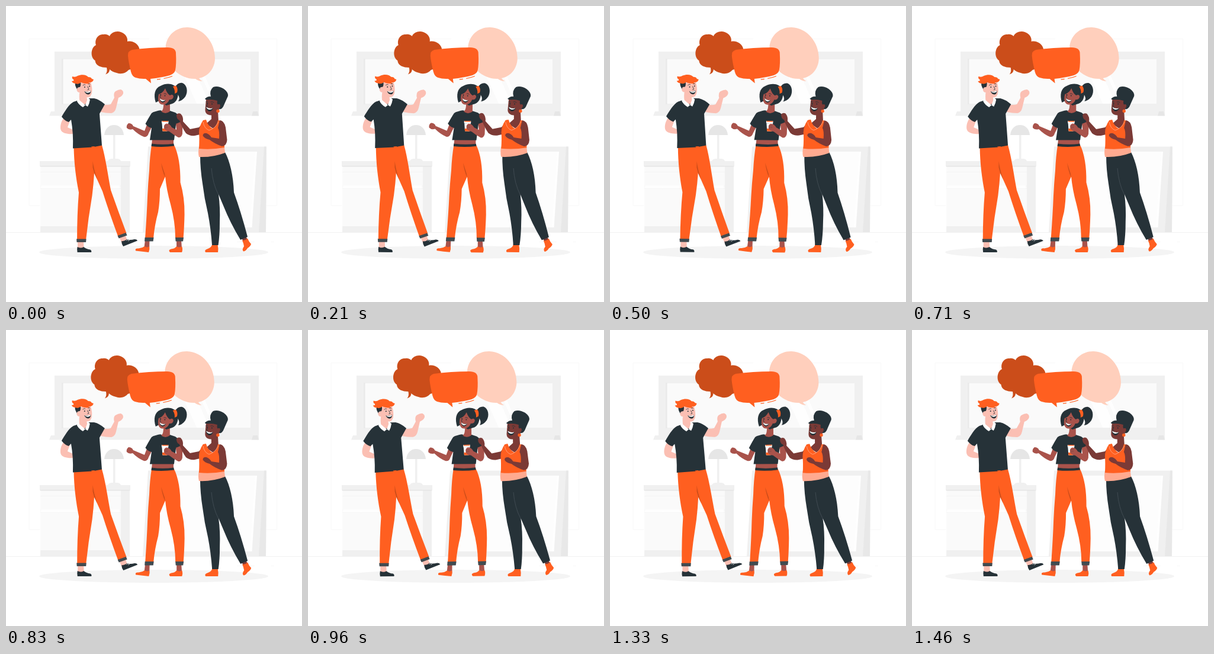
An HTML page that plays this animation: 500 px wide and 500 px high, repeating every 1500 ms.

```html
<!DOCTYPE html>
<html lang="en">
<head>
<meta charset="utf-8">
<title>Friends talking</title>
<style>
html, body { margin: 0; width: 100%; height: 100%; overflow: hidden; background: #fff; }
svg { display: block; width: 100%; height: 100%; }
.o { fill: #ff5f20; }
.r { fill: #cb4d1a; }
.d { fill: #263238; }
.c { fill: #414b50; }
.w { fill: #fff; }
.s1 { fill: #fbbfb3; }
.s2 { fill: #a9534b; }
.s3 { fill: #7b3a36; }
.g1 { fill: #fafafa; }
.g2 { fill: #f0f0f0; }
.g3 { fill: #e6e6e6; }
.l { fill: none; stroke: #263238; stroke-width: .8; stroke-linecap: round; stroke-linejoin: round; }
</style>
</head>
<body>
<svg viewBox="0 0 500 500" xmlns="http://www.w3.org/2000/svg">
  <g id="room">
    <path d="M39 337V55.500H242M270 55.500H457.500V337H440M39 337H57" fill="none" stroke="#f8f8f8"/>
    <path d="M0 382.500H500" stroke="#f1f1f1"/>
    <path d="M390 398.500h30M448 398.500h5" stroke="#f7f7f7"/>
    <path class="g2" d="M82 77H427V179H82Z"/>
    <path class="g3" d="M94 89H97V166H94Z" opacity=".6"/>
    <path class="g1" d="M96.500 90H413V165H96.500Z"/>
    <path class="w" d="M288 90H310L344 165H322ZM317 90H323L357 165H351Z" opacity=".75"/>
    <path class="g2" d="M76 178H427V185.500H73Z"/>
    <path class="g3" d="M417 178H425L427 185.500H415Z"/>
    <path class="g2" d="M240 237.500H440L439 382H231Z"/>
    <path class="g3" d="M436 237.500H440L439 382H427Z" opacity=".75"/>
    <path class="w" d="M250 246H424L415.500 374H241Z"/>
    <path class="g1" d="M250 246H421L412 374H241Z" opacity=".4"/>
    <path class="g1" d="M58 270H196V382H58Z"/>
    <path class="g2" d="M194 270H209V382H194Z"/>
    <path class="g2" d="M57 262H210V271H57Z"/>
    <path class="g3" d="M58 270H209V271.500H58Z"/>
    <path d="M58 280.500H194M58 304H194M58 308H194" stroke="#f4f4f4"/>
    <path class="w" d="M59 303H192V308H59Z" opacity=".8"/>
    <path class="g2" d="M58 372H194V382H58Z"/>
    <path class="g2" d="M181 217H184.500V258H181ZM172 262Q173 258 180 258H187Q193 258 194 262Z"/>
    <path class="g3" d="M166 218C167 207 174 201 182.500 201S198 207 199 218Z"/>
    <ellipse cx="249.500" cy="416" rx="193.500" ry="11" fill="#f4f4f4"/>
  </g>

  <g id="talk">
    <path fill="#ffcfbc" d="M269.500 70C271 49 288 35.500 307 36C334 37 353 62 353 88C353 105 342 119 326 122Q328 125 332 127Q325 127 320 123C297 124 269 105 269.500 70Z"/>
    <path class="r" d="M152 66C149 56 156 47 165 48C169 47 173 49 175 51C178 44 187 41.500 194 44C202 47 206 53 205 60C214 58 224 64 225.500 73C227 82 222 88 217 91C219 99 214 107 207 108C203 113 195 116 187 113C182 112 178 110 175 107C175 111 173 114 168 115.500C171 112 171 108 170 104C161 104 151 101 150.500 92C142 87 143 70 152 66Z"/>
    <path class="o" d="M213 74Q242 70 273 70Q287 70 287 80Q288 98 286 108Q285 114 277 117Q262 121 244 123L245 130.500L236 123Q226 123.500 219 121Q213 119 211 111Q207 95 206 84Q205.500 76 213 74Z"/>
    <path d="M255 124.200L261 123.400M266.500 122.500Q275 121 281 118.500" fill="none" stroke="#ff5f20" stroke-width="1.200"/>
  </g>

  <g id="man">
    <path class="s1" d="M121 397H131L131.500 410H121ZM191 390L201 386L206 399L196 401Z"/>
    <path class="d" d="M120.500 407Q126 410 131 407Q136 411 142 411.500Q145 413 144 416H120.500Q119.500 411 120.500 407Z"/>
    <path class="d" d="M195 397Q200 398 204 394Q210 396 217 394Q221 394 222 396.500L198 406Q195 402 195 397Z"/>
    <path d="M203 396l4-2M206 397l3-2" stroke="#fff" stroke-width=".8"/>
    <path class="o" d="M114.500 239L162 235C168 255 172 285 177 311Q190 348 203.500 384L189.500 390Q174 348 163 313L149 282Q148 300 145.500 320Q139 358 135 395H120Q120 352 123 315C118 290 115 265 114.500 239Z"/>
    <path class="r" d="M146.500 262Q148 274 154 293L149 282L146.500 273Z"/>
    <path class="c" d="M119 393.500H135.500L135 399H119.500ZM188.500 388L202.500 383L204.500 387.500L190.500 392.500Z"/>
    <path class="s1" d="M97 190C92 197 91 206 93 210C95 215 105 217 114 216Q119 219 130 217.500Q134 216 133.500 211Q132 207 125 208L113 209L104 205L108 194Z"/>
    <path class="l" d="M125 211q4-1 4 2l-2 3" stroke-width=".5" opacity=".5"/>
    <path class="s1" d="M161 166Q171 168 177 166L183 155Q181 147 185 144Q190 141 194 141Q199 143 198 148Q196 153 190 155L186 172Q184 180 178 181Q168 181 160 179Z"/>
    <path class="d" d="M123 159L114 162C106 166 99 179 94 187Q99 194 106 196L110 192Q114 215 113 240.500L146 238.500L162 235.500Q160 208 158 182L167 166Q158 158 149 156L139 156Q136 166 123 159Z"/>
    <path class="o" d="M144 237.500l3 4 3-4.500Z"/>
    <path class="s1" d="M124 147L136 152L138 163Q133 169 126 164Q123 160 124 147Z"/>
    <path class="w" d="M121.500 156L124 159L134 167.500L130 171Q123 167 120 161ZM134 167.500L138.500 155L142 158Q141 165 138 170Z"/>
    <path class="s1" d="M122 134Q131 124 143 128C146 137 147 148 142 153C135 157 126 152 124 146C119 146 118 138 122 137Z"/>
    <path class="d" d="M117 130L126 127Q127 134 125 137L123.500 137Q119 138 120.500 141Q116 135 117 130Z"/>
    <path class="o" d="M118 131Q113 131 111 127Q116 127 114 124Q111 123 112 119Q117 121 121 118C128 115 136 116 139 120Q144 120 145 123L148 124Q147 130 139 129L142 131Q133 132 127 129Q122 133 118 131Z"/>
    <path class="d" d="M132.500 144Q138 145.500 143.500 143Q143 149 139 149.500Q134 149 132.500 144Z"/>
    <path class="w" d="M133 144.300Q138 145.500 143.200 143.300Q143 146 139 146.600Q135 147 133 144.300Z"/>
    <path class="l" d="M130 134q2-2 4-1M139 132q2-1 3 0M138 136l2 5-2 .5"/>
    <circle class="d" cx="133" cy="137" r="1"/><circle class="d" cx="141.200" cy="135.500" r="1"/>
  </g>

  <g id="girl">
    <path class="s2" d="M235 395H242.500L242 411H233ZM288 395H296L297 411H288Z"/>
    <path class="o" d="M234 406Q238 409 242 406Q243 411 241 416Q230 415 219 413.500Q217 409 224 409.500Q230 409 234 406ZM288 406Q293 409 297 406Q299 411 297 416H277Q273 412 279 410.500Q285 410 288 406Z"/>
    <path class="o" d="M246 235H284C291 249 295 271 294.500 298Q302 324 301.500 352Q301 375 299.500 392H286Q286 365 278 335Q271 310 269 288L260 309Q260 330 257 348Q251 370 249 392H235Q238 350 239 322Q240 300 242 278Q243 253 246 235Z"/>
    <path class="r" d="M262 265Q264 279 269 290L268 283Z"/>
    <path class="c" d="M234.500 391H249.500L248.500 397.500H234ZM286 391H300L299 397.500H286.500Z"/>
    <path class="s2" d="M247 224H283V235H246Z"/>
    <path class="d" d="M246 232.500Q265 235 283.500 232.500L284 236.500Q265 239 245.500 237Z"/>
    <path class="s2" d="M239 198L234 211L215 203Q213 198 207 198Q203 201 204 206Q208 210 214 208Q223 217 233 221Q239 222 241 215L247 203Z"/>
    <path class="d" d="M253 178Q261 175 263 177Q270 182 277 177L286 180Q293 184 297 197L287 201L284 226.500H243L246 206Q240 205 235.500 199Q242 187 246 181Q248 179 253 178Z"/>
    <path class="s2" d="M266 160L277 158V178Q269 184 262 178Q267 176 266 160Z"/>
    <path class="w" d="M263 194H274.500V198H263ZM263.500 198H274L272.500 211.500H264.500Z"/>
    <path class="o" d="M263.700 194H274V195.500H263.700ZM264 207H273L272.500 211.500H264.500Z"/>
    <path class="s2" d="M287 199L297 195Q299 205 298 216Q296 223 291 222Q282 217 276 212Q268 211 267 206Q266 200 271 198.500Q277 199 280 205L288 209Z"/>
    <path class="l" d="M268 203l5-1M268 206l5-1" stroke-width=".5" opacity=".4"/>
    <path class="d" d="M286 137Q290 129 298 130C306 133 308 145 303 153Q298 160 291 161Q295 156 290 149Z"/>
    <path class="d" d="M253 163C249 150 251 139 261 135C272 129 285 131 289 140C293 149 290 162 281 165L271 168L259 160Z"/>
    <path class="o" d="M282 136L287 134.500Q291 139 289 146L285 148Q286 142 282 136Z"/>
    <path class="s2" d="M258 149Q265 147 269 139Q272 148 277 151Q282 148 283 153Q282 159 276 158C274 164 268 168 262 166C257 164 256 156 258 149Z"/>
    <path class="d" d="M259.500 156Q264 160 270 158.500Q268 163 264 163Q260 161 259.500 156Z"/>
    <path class="w" d="M259.700 156.300Q264 160 269.800 158.600Q267 161.300 264 161Q260.500 160 259.700 156.300Z"/>
    <path class="l" d="M259 147q1-1.500 3-1M267 148q2-1 4 1M262 150l-2 4 2 1"/>
    <circle class="d" cx="261" cy="150" r=".9"/><circle class="d" cx="268.500" cy="151.500" r="1"/>
  </g>

  <g id="pal">
    <path class="s3" d="M348 401H357V411H348ZM398 392L405 389L410 399L403 403Z"/>
    <path class="o" d="M348 403Q353 405 357.500 403Q359 410 358 416H337Q334 412 341 410Q347 408 348 403Z"/>
    <path class="o" d="M399 396Q404 396 408 392.500Q410 398 414 402Q413 406 408 409Q405 414 401 414.500Q398 411 402 406Q401 400 399 396Z"/>
    <path class="d" d="M328 252L370 247C378 262 384 286 385 315Q397 348 408 390L396 395Q379 367 367 337L359 318Q362 340 361 365Q361 388 358.500 404H348Q346 376 341 350Q335 325 332 300Q328 275 328 252Z"/>
    <path d="M347 274Q349 300 359 319" fill="none" stroke="#465158" stroke-width=".8"/>
    <path d="M326 238H369L370 248Q349 256 326 255Q324 247 326 238Z" fill="#ffaa90"/>
    <path class="s3" d="M337 193L326 205L311 208L299 195Q300 187 295 182Q290 180 288 184Q288 191 293 193Q297 205 304 215Q310 220 319 219L332 216Z"/>
    <path class="s3" d="M347 181L358 178L359 194L365 196L353 209L338 199L347 191Z"/>
    <path class="o" d="M333 193L338 192Q341 203 349 207Q356 203 358 193L364 194Q370 205 369 239Q348 243 326 241Q327 225 326 214Q326 203 333 193Z"/>
    <path d="M333 196Q335 207 343 210Q354 207 359 195" fill="none" stroke="#ffb59a" stroke-width=".7"/>
    <path class="s3" d="M361 193Q369 194 371 205L373.500 226Q373 236 365 237Q353 233 344 226Q335 224 332.500 219Q333 214 339 215Q344 217 347 222L360 224Q361 211 358 206Z"/>
    <path class="s3" d="M338 158Q348 153 359 158L361 171Q359 181 351 184C342 186 336 182 336.500 175Z"/>
    <path class="d" d="M346 153Q343 143 350 137Q358 134 368 140Q376 146 375 152L367 170Q364 175 360 174L359 167Q356 167 357 160Q351 158 344 158Q337 159 336 157Q341 152 346 153Z"/>
    <path class="s3" d="M357 167Q362 164 362 169Q361 174 357 174Z"/>
    <circle class="o" cx="358" cy="177.500" r="2.700"/>
    <path class="d" d="M338 170Q343 174 350 172.500Q348 178 343 178Q338 176 338 170Z"/>
    <path class="w" d="M338.200 170.500Q343 174 349.500 172.600Q347 175.500 343 175Q339 174 338.200 170.500Z"/>
    <path class="l" d="M338 162q2-1 3 0M346 162q3-1 5 1M341 165l-2 4 2 .5"/>
    <circle class="d" cx="340" cy="164.500" r=".9"/><circle class="d" cx="348" cy="165.500" r="1"/>
  </g>
</svg>
<script>
const LOOP = 1500, FRAMES = 36, LAG = 8;
const $ = id => document.getElementById(id);

// [part of loop, value]
const SWAY = [[0, 0], [.25, 1], [.75, -1], [1, 0]];
const SHAKE = [[0, 0], [.1, -1], [.2, 2], [.3, -4], [.4, 4], [.5, -4],
  [.6, 4], [.7, -4], [.8, 2], [.9, -1], [1, 0]];
const PEOPLE = [["man", 156, 266], ["girl", 255, 273], ["pal", 351, 276]];

const linear = p => p;

// cubic-bezier(.25, .1, .25, 1)
function ease(p) {
  let lo = 0, hi = 1;
  const at = (u, a, b) => 3 * u * (1 - u) ** 2 * a + 3 * u * u * (1 - u) * b + u ** 3;
  for (let i = 0; i < 20; i++) {
    const mid = (lo + hi) / 2;
    if (at(mid, .25, .25) < p) lo = mid; else hi = mid;
  }
  return at(lo, .1, 1);
}

function sample(steps, t, curve) {
  const i = Math.max(1, steps.findIndex(s => s[0] >= t));
  const [t0, a] = steps[i - 1], [t1, b] = steps[i];
  return a + (b - a) * curve((t - t0) / (t1 - t0));
}

function draw(ms) {
  const step = Math.floor(ms % LOOP / LOOP * FRAMES);
  const t = (step / FRAMES + 1 - LAG / LOOP) % 1;
  const angle = sample(SWAY, t, linear);
  for (const [id, x, y] of PEOPLE) $(id).setAttribute("transform", `rotate(${angle} ${x} ${y})`);
  $("talk").setAttribute("transform", `translate(${sample(SHAKE, t, ease)} 0)`);
}

const start = performance.now();
function tick() {
  draw(performance.now() - start);
  requestAnimationFrame(tick);
}
tick();
</script>
</body>
</html>
```
